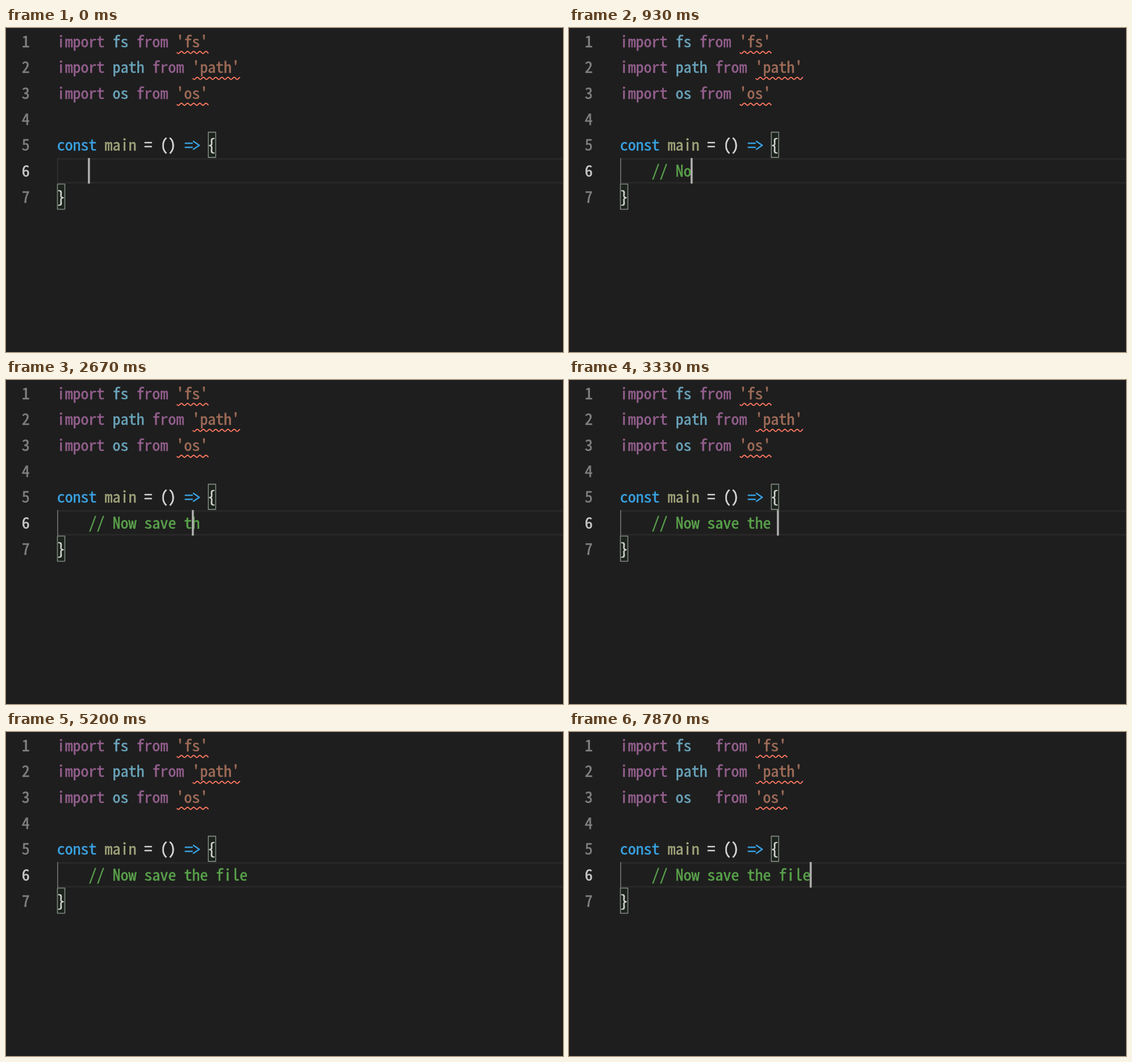
An HTML page with a canvas that plays this animation: 980 px wide and 571 px high, repeating every 8000 ms.

```html
<!DOCTYPE html>
<html lang="en">
<head>
<meta charset="utf-8">
<title>Typing and formatting</title>
<style>
html, body { margin: 0; width: 100%; height: 100%; overflow: hidden; background: #1e1e1e; }
canvas { display: block; }
</style>
</head>
<body>
<canvas id="stage" width="980" height="571"></canvas>
<script>
const g = document.getElementById('stage').getContext('2d');
const LOOP = 8000, LEFT = 90, COL = 13.97, ROW = 45.7, ALIGN_AT = 6000;
const FAMILY = '"Noto Sans Mono CJK JP", "Noto Sans Mono CJK SC", "Noto Sans Mono", monospace';
const PURPLE = '#925e8c', CYAN = '#69a2b8', STRING = '#9d6b58', BLUE = '#38a0df',
      YELLOW = '#a1a37b', WHITE = '#d6d6d6', GREEN = '#59a14b', RED = '#f8765f';

const COMMENT = '// Now save the file', INDENT = 4;
const keyTimes = [70, 200, 330, 600, 800, 1400, 1670, 1820, 2000, 2130,
                  2270, 2470, 2645, 2645, 2870, 3280, 3600, 3700, 3800, 3884];
const blinks = [4120, 4580, 5000, 5600, 6270, 6600, 7100, 7870];

// Wide fallback fonts are reduced so that letters still fit the column grid.
g.font = '28px ' + FAMILY;
const size = Math.min(28, 28 * 15 / g.measureText('m').width);

const colX = col => LEFT + col * COL;
const rowTop = row => 0.7 + row * ROW;
const countUntil = (times, t) => times.filter(x => x <= t).length;

function rect(x, y, w, h, color) {
  g.fillStyle = color;
  g.fillRect(x, y, w, h);
}

// A thin outline gives the letters a medium weight.
function write(text, col, row, color) {
  g.fillStyle = g.strokeStyle = color;
  g.lineWidth = 0.6;
  [...text].forEach((ch, i) => {
    const x = colX(col + i + 0.5) - 0.3, y = rowTop(row) + 32.8;
    g.fillText(ch, x, y);
    g.strokeText(ch, x, y);
  });
}

function stroke(color, width, points) {
  g.strokeStyle = color;
  g.lineWidth = width;
  g.beginPath();
  points.forEach(([x, y], i) => i ? g.lineTo(x, y) : g.moveTo(x, y));
  g.stroke();
}

function squiggle(col, row, length) {
  const points = [], start = colX(col) + 1;
  for (let x = 0; x <= length * COL; x += 0.6)
    points.push([start + x, rowTop(row) + 42.3 + 1.9 * Math.sin(x / 10.8 * 2 * Math.PI)]);
  stroke(RED, 1.9, points);
}

function importLine(name, row, aligned) {
  const from = 8 + (aligned ? 4 : name.length);
  write('import', 0, row, PURPLE);
  write(name, 7, row, CYAN);
  write('from', from, row, PURPLE);
  write(`'${name}'`, from + 5, row, STRING);
  squiggle(from + 5, row, name.length + 2);
}

function brace(ch, col, row) {
  const x = colX(col) + 0.5, y = rowTop(row) + 0.1;
  rect(x, y, 13, 44.5, '#1c231c');
  g.strokeStyle = '#7f8881';
  g.lineWidth = 1.6;
  g.strokeRect(x, y, 13, 44.5);
  write(ch, col, row, WHITE);
}

function arrow(col, row) {
  const x = colX(col), y = rowTop(row) + 23.2;
  for (const dy of [-3.6, 3.6]) stroke(BLUE, 2.5, [[x + 1, y + dy], [x + 15, y + dy]]);
  stroke(BLUE, 2.5, [[x + 15.5, y - 7.5], [x + 26.5, y], [x + 15.5, y + 7.5]]);
}

function caretColumn(t, typed) {
  if (!typed) return INDENT;
  const last = keyTimes[typed - 1];
  const before = countUntil(keyTimes, last - 1);
  const p = Math.min(1, (t - last) / 80);
  return INDENT + before + (typed - before) * (1 - (1 - p) ** 2);
}

function draw(t) {
  const typed = countUntil(keyTimes, t), top = rowTop(5);
  g.font = `${size}px ${FAMILY}`;
  g.textAlign = 'center';
  g.lineJoin = 'round';
  rect(0, 0, 980, 571, '#1e1e1e');

  rect(91, top, 889, 3, '#282828');
  rect(91, top + 42, 889, 3, '#282828');
  rect(LEFT, top, 1.7, 45, typed ? '#707070' : '#323232');

  for (let row = 0; row < 7; row++)
    write(String(row + 1), -4.44, row, row === 5 ? '#c9c9c9' : '#808080');

  ['fs', 'path', 'os'].forEach((name, row) => importLine(name, row, t >= ALIGN_AT));

  write('const', 0, 4, BLUE);
  write('main', 6, 4, YELLOW);
  write('= ()', 11, 4, WHITE);
  arrow(16, 4);
  brace('{', 19, 4);
  write(COMMENT.slice(0, typed), INDENT, 5, GREEN);
  brace('}', 0, 6);

  if (countUntil(blinks, t) % 2 === 0)
    rect(colX(caretColumn(t, typed)) - 1.8, top, 3.6, 45, '#aeafad');
}

function tick() {
  draw(performance.now() % LOOP);
  requestAnimationFrame(tick);
}
tick();
</script>
</body>
</html>
```
